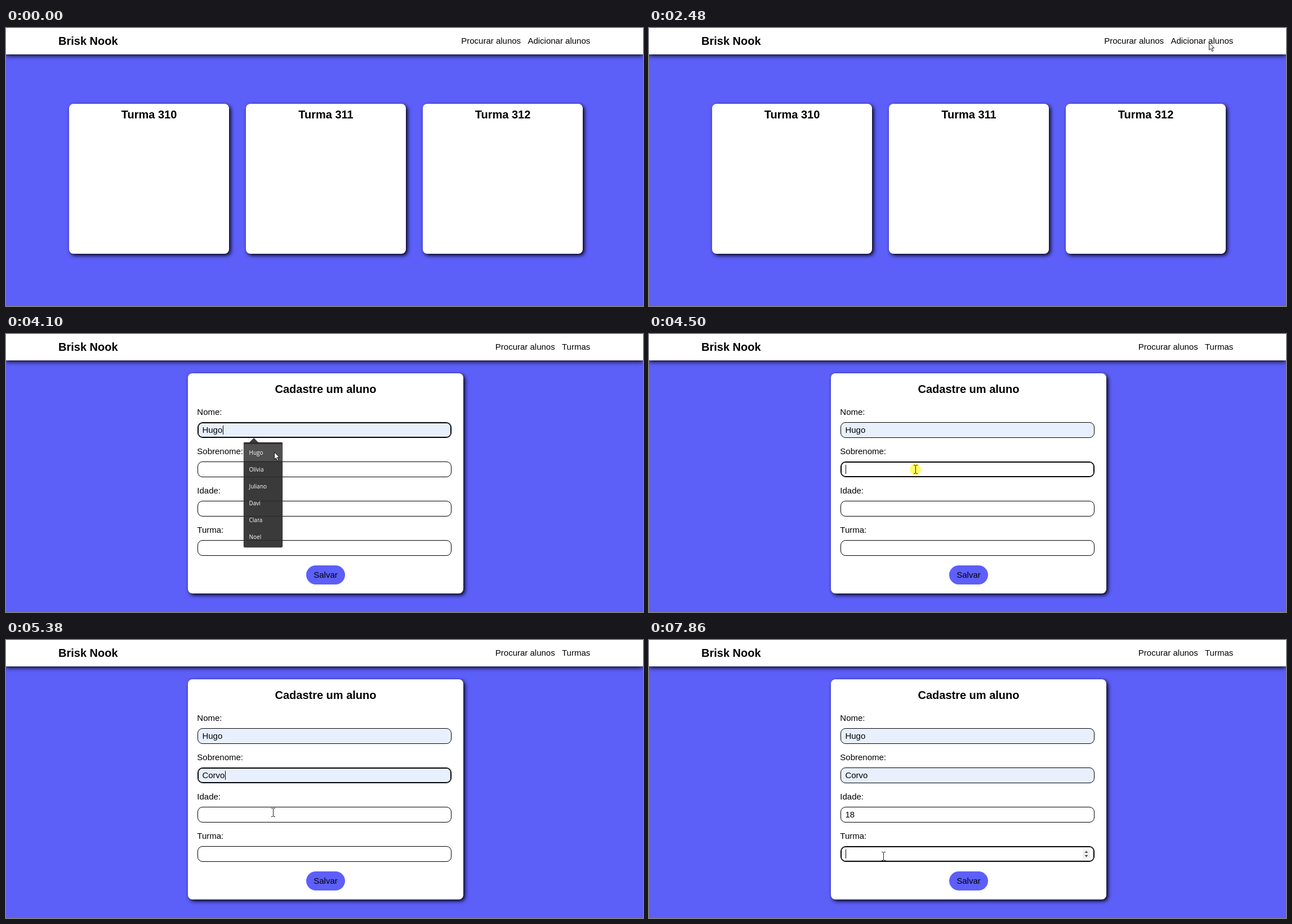
Write an HTML page that moves like this. It is 1131 by 495 pixels and loops after 8 s.

```html
<!DOCTYPE html>
<html lang="pt">
<head>
<meta charset="utf-8">
<title>Cadastro de alunos</title>
<style>
html, body { margin: 0; width: 100%; height: 100%; overflow: hidden; }
body { position: relative; background: #5d5ff9; color: #000; font: 15px/20px "Liberation Sans", Arial, sans-serif; }
div, svg { position: absolute; box-sizing: border-box; white-space: pre; }
header { position: absolute; z-index: 1; left: 0; top: 0; width: 1131px; height: 47px; background: #fff; box-shadow: 0 2px 8px #000; }
.logo { left: 93px; top: 13px; font-size: 20px; font-weight: bold; }
nav { position: absolute; left: 0; width: 1037.3px; top: 13px; display: flex; justify-content: flex-end; gap: 12.3px; white-space: pre; }
.card { background: #fff; border-radius: 8px; box-shadow: 2.8px 2.8px 7.5px #000; }
.title { left: 0; width: 100%; text-align: center; font-size: 20px; font-weight: bold; }
.field { left: 17px; width: 451px; height: 27.5px; border: 1px solid #000; border-radius: 9px; background: #fff; }
.field.filled { background: #e8f0fe; }
.field.focus { box-shadow: inset 0 0 0 1px #000; }
.value { left: 7.4px; top: 2.5px; }
.caret { display: inline-block; width: 1px; height: 16px; margin-left: .4px; vertical-align: -3px; background: #000; }
.spin { left: 429px; top: 5px; }
.save { left: 210px; top: 341.5px; width: 69px; height: 34.5px; border-radius: 17px; background: #5d5ff9; line-height: 33px; text-align: center; }
.list { left: 422px; width: 69px; height: 187px; border-radius: 2px; background: rgba(44,44,44,.93); color: #fff; font: 10px/30px "Open Sans", "Noto Sans", sans-serif; box-shadow: 0 0 2px rgba(0,0,0,.5); }
.list::before { content: ""; position: absolute; left: 10px; top: -8px; border: solid transparent; border-width: 0 8px 8px; border-bottom-color: #3b3b3b; }
.list::after { content: ""; position: absolute; left: 0; top: 0; width: 69px; height: 3px; background: #2f2f2f; border-radius: 2px 2px 0 0; }
.list div { left: 0; width: 69px; height: 30px; padding-left: 9.5px; }
.list .hover { background: #505051; }
#cursor { z-index: 2; left: 0; top: 0; width: 0; height: 0; }
#cursor svg { left: -12px; top: -12px; }
</style>
</head>
<body>
<header><div class="logo">Brisk Nook</div><nav><span>Procurar alunos</span><span id="link"></span></nav></header>
<div id="classes"></div>
<div id="form" class="card" style="left:323px;top:70px;width:489px;height:392px">
  <div class="title" style="top:18px">Cadastre um aluno</div>
  <div class="save">Salvar</div>
</div>
<div id="cursor">
  <svg width="36" height="36" viewBox="-12 -12 36 36">
    <circle id="glow" r="10" fill="#ff0" fill-opacity=".62"/>
    <path id="arrow" d="M.5.5V13.2L3.4 10.5 5.7 15.6 7.8 14.7 5.6 9.7H9.6Z" fill="#fff" stroke="#000" stroke-width=".9"/>
    <path id="beam" d="M-3-7.5H-1L.5-6.5 2-7.5H4M.5-6.5V6.5M-3 7.5H-1L.5 6.5 2 7.5H4" fill="none" stroke="#222"/>
  </svg>
</div>
<script>
const LOOP = 8000, STEP = 67, START = 420;
const $ = id => document.getElementById(id);

function add(parent, cls, text = '', style = {}) {
  const el = document.createElement('div');
  el.className = cls;
  el.textContent = text;
  Object.assign(el.style, style);
  parent.append(el);
  return el;
}
const show = (el, on) => { el.style.visibility = on ? 'visible' : 'hidden'; };

[310, 311, 312].forEach((number, i) => {
  const card = add($('classes'), 'card', '', { left: 112 + 314 * i + 'px', top: '134.5px', width: '284px', height: '267px' });
  add(card, 'title', 'Turma ' + number, { top: '9.5px' });
});

const SPINNER = '<svg class="spin" width="13" height="16"><rect width="13" height="16" rx="1" fill="#efefef"/>' +
  '<path d="M3.5 6 6.5 2.5 9.5 6ZM3.5 10 6.5 13.5 9.5 10Z" fill="#444"/></svg>';

const fields = ['Nome:', 'Sobrenome:', 'Idade:', 'Turma:'].map((label, i) => {
  add($('form'), '', label, { left: '16.3px', top: 59 + 70 * i + 'px' });
  const box = add($('form'), 'field', '', { top: 87 + 70 * i + 'px' });
  if (i > 1) box.innerHTML = SPINNER;
  const value = add(box, 'value');
  const text = document.createElement('span'), caret = document.createElement('span');
  caret.className = 'caret';
  value.append(text, caret);
  return { box, text, caret, spin: box.querySelector('svg') };
});

const lists = [
  ['Hugo', 'Olívia', 'Juliano', 'Davi', 'Clara', 'Noel'],
  ['Corvo', 'Campos', 'Noronha', 'Godinho', 'Lemos', 'Carvalho']
].map((names, i) => {
  const list = add(document.body, 'list', '', { top: 193 + 70 * i + 'px' });
  const rows = names.map((name, k) => add(list, '', name, { top: 3 + 30 * k + 'px' }));
  return { list, first: rows[0] };
});

// Each entry changes some of the state from its time on.
const EVENTS = [
  [0, { form: false, shape: '', glow: false, focus: -1, caret: false, list: -1, hover: false, values: ['', '', '', ''] }],
  [420, { shape: 'arrow' }],
  [2420, { glow: true }],
  [2480, { glow: false }],
  [2550, { form: true }],
  [2820, { shape: 'beam' }],
  [3170, { glow: true, focus: 0, caret: true }],
  [3300, { glow: false }],
  [3440, { glow: true }],
  [3510, { glow: false, list: 0 }],
  [3710, { shape: 'arrow' }],
  [3970, { hover: true, values: ['Hugo', '', '', ''] }],
  [4170, { glow: true }],
  [4240, { glow: false, list: -1, hover: false }],
  [4370, { shape: 'beam' }],
  [4440, { glow: true, focus: 1 }],
  [4510, { glow: false }],
  [4570, { glow: true }],
  [4640, { glow: false, list: 1 }],
  [4770, { shape: 'arrow' }],
  [4900, { hover: true, values: ['Hugo', 'Corvo', '', ''] }],
  [5180, { glow: true }],
  [5240, { glow: false, list: -1, hover: false }],
  [5380, { shape: 'beam' }],
  [5440, { glow: true, focus: 2 }],
  [5510, { glow: false }],
  [6000, { caret: false }],
  [6520, { caret: true, values: ['Hugo', 'Corvo', '1', ''] }],
  [6720, { values: ['Hugo', 'Corvo', '18', ''] }],
  [7310, { shape: 'arrow' }],
  [7720, { shape: 'beam' }],
  [7790, { glow: true, focus: 3 }],
  [7860, { glow: false }]
];

// Pointer path: time, x, y
const PATH = [
  [420, 1058, 482], [620, 835, 412], [760, 902, 413], [960, 940, 247], [1180, 965, 72],
  [1450, 983, 42], [1880, 994, 26], [2550, 994, 26], [2690, 790, 90], [2820, 590, 157],
  [3030, 590, 157], [3170, 588, 164], [3510, 588, 164], [3830, 500, 196], [4040, 476, 210],
  [4170, 476, 210], [4440, 473, 241], [4640, 473, 241], [4900, 470, 280], [5040, 469, 287],
  [5180, 469, 287], [5440, 476, 313], [5780, 476, 313], [6000, 453, 317], [7130, 453, 317],
  [7450, 298, 428], [7540, 305, 426], [7790, 416, 385], [LOOP, 416, 385]
];

function pointAt(time) {
  const t = Math.max(START, START + Math.floor((time - START + 15) / STEP) * STEP);
  const i = PATH.findIndex(p => p[0] > t);
  const [t0, x0, y0] = PATH[i - 1], [t1, x1, y1] = PATH[i];
  const k = (t - t0) / (t1 - t0);
  return [x0 + (x1 - x0) * k, y0 + (y1 - y0) * k].map(Math.round);
}

function draw(t) {
  const s = Object.assign({}, ...EVENTS.filter(e => e[0] <= t).map(e => e[1]));
  $('link').textContent = s.form ? 'Turmas' : 'Adicionar alunos';
  $('classes').style.display = s.form ? 'none' : 'block';
  $('form').style.display = s.form ? 'block' : 'none';
  fields.forEach((f, i) => {
    const active = s.focus === i;
    f.text.textContent = s.values[i];
    f.box.classList.toggle('focus', active);
    f.box.classList.toggle('filled', i < 2 && s.values[i] !== '');
    f.caret.style.opacity = active && s.caret ? 1 : 0;
    if (f.spin) f.spin.style.opacity = active ? 1 : 0;
  });
  lists.forEach(({ list, first }, i) => {
    show(list, s.list === i);
    first.classList.toggle('hover', s.hover);
  });
  const [x, y] = pointAt(t);
  $('cursor').style.transform = `translate(${x}px,${y}px)`;
  show($('arrow'), s.shape === 'arrow');
  show($('beam'), s.shape === 'beam');
  show($('glow'), s.glow);
}

const begin = performance.now();
function tick() {
  draw((performance.now() - begin) % LOOP);
  requestAnimationFrame(tick);
}
tick();
</script>
</body>
</html>
```
